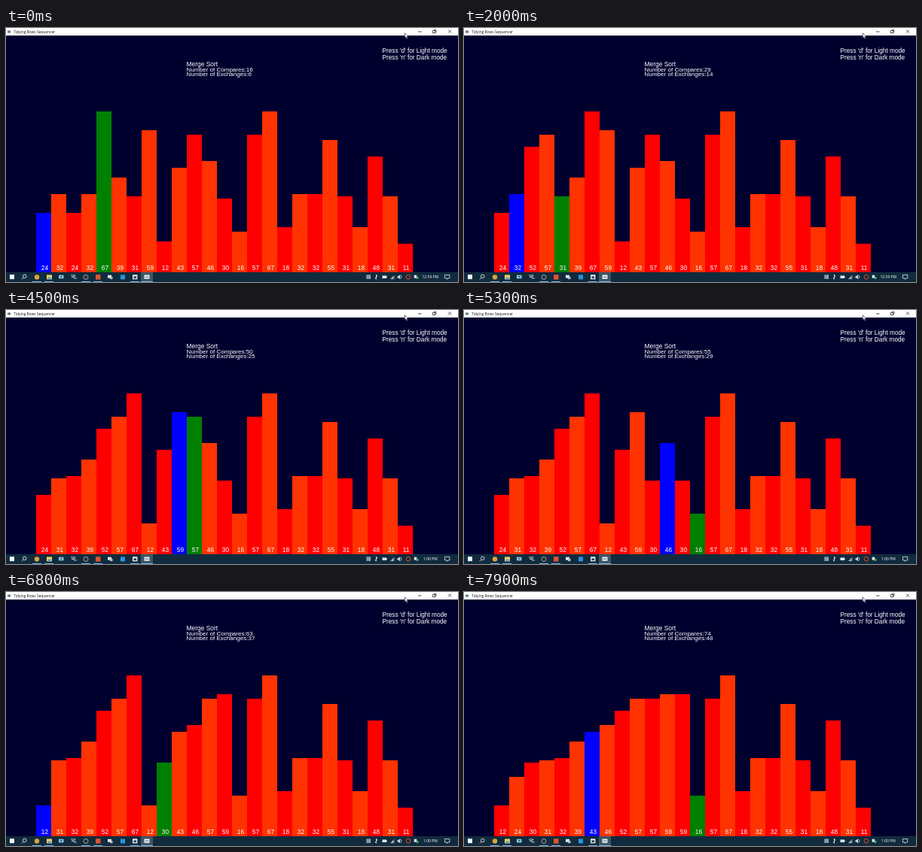
Recreate the animation shown at these times as an HTML page with a canvas. Size 600x338 px, loop 8000 ms.

```html
<!DOCTYPE html>
<html lang="en">
<head>
<meta charset="utf-8">
<title>Merge sort</title>
<style>
html, body { margin: 0; width: 100%; height: 100%; overflow: hidden; background: #00002f; }
canvas { display: block; width: 600px; height: 338px; }
</style>
</head>
<body>
<canvas id="stage" width="600" height="338"></canvas>
<script>
const ctx = document.getElementById('stage').getContext('2d');
const LOOP = 8000, STEP = 100, CLOCK_TURN = 2600;
const START = [52, 57, 24, 32, 67, 39, 31, 59, 12, 43, 57, 46, 30,
  16, 57, 67, 18, 32, 32, 55, 31, 18, 48, 31, 11];
// time of the first write of each merge; the first two lie before the loop
const MERGE_AT = [-1200, -600, -100, 700, 1300, 2000, 3200, 3800, 4600, 5200, 5800, 6800];
const SANS = '"Liberation Sans", Arial, sans-serif';
const UI = '"Open Sans", "Noto Sans", sans-serif';

// ---- sorting, recorded as timed states ----
const states = [];
const list = START.slice();
let compares = 0, exchanges = 0, merges = 0, left = 0, right = 0;

function record(at) {
  states.push({ at, list: list.slice(), compares, exchanges, left, right });
}

function merge(lo, mid, hi) {
  const first = MERGE_AT[merges++];
  if (first === undefined) return;
  if (states.length) record(states[states.length - 1].at + STEP);
  const old = list.slice();
  left = lo;
  right = mid + 1;
  for (let k = lo; k <= hi; k++) {
    const takeLeft = right > hi || (left <= mid && old[left] <= old[right]);
    list[k] = takeLeft ? old[left++] : old[right++];
    compares++;
    exchanges++;
    record(first + (k - lo) * STEP);
  }
}

function sort(lo, hi) {
  if (merges >= MERGE_AT.length) return;
  compares++;
  if (lo >= hi) return;
  const mid = (lo + hi) >> 1;
  sort(lo, mid);
  sort(mid + 1, hi);
  merge(lo, mid, hi);
}

sort(0, START.length - 1);

// ---- drawing helpers ----
function rect(x, y, w, h, color) {
  ctx.fillStyle = color;
  ctx.fillRect(x, y, w, h);
}

function disc(x, y, r, color) {
  ctx.fillStyle = color;
  ctx.beginPath();
  ctx.arc(x, y, r, 0, Math.PI * 2);
  ctx.fill();
}

function ring(x, y, r, color) {
  ctx.strokeStyle = color;
  ctx.lineWidth = 0.9;
  ctx.beginPath();
  ctx.arc(x, y, r, 0, Math.PI * 2);
  ctx.stroke();
}

function path(points, color, fill) {
  ctx.beginPath();
  points.forEach(([x, y], i) => i ? ctx.lineTo(x, y) : ctx.moveTo(x, y));
  if (fill) {
    ctx.closePath();
    ctx.fillStyle = fill;
    ctx.fill();
  }
  if (color) {
    ctx.strokeStyle = color;
    ctx.lineWidth = 0.8;
    ctx.stroke();
  }
}

function box(x, y, w, h, color) {
  ctx.strokeStyle = color;
  ctx.lineWidth = 0.8;
  ctx.strokeRect(x, y, w, h);
}

function text(str, x, y, size, color = '#fff', family = SANS) {
  ctx.font = size + 'px ' + family;
  ctx.fillStyle = color;
  ctx.fillText(str, x, y);
}

// ---- scene parts ----
function titleBar() {
  rect(0, 0, 600, 10, '#fff');
  rect(2, 3.5, 4, 3, '#5d7f86');
  text('Tidying Rows Sequencer', 10, 7, 4.9, '#111', UI);
  rect(547, 4.5, 4.5, 0.9, '#333');
  box(566.6, 3.6, 3, 3, '#333');
  path([[568, 3.4], [568, 2.4], [571, 2.4], [571, 5.4], [570, 5.4]], '#333');
  path([[587, 2.5], [591, 6.5]], '#333');
  path([[591, 2.5], [587, 6.5]], '#333');
}

function pointer() {
  path([[529.3, 6.8], [529.3, 13], [530.8, 11.8], [532, 14.3], [533, 13.8],
    [532, 11.4], [533.8, 11.2], [529.3, 6.8]], '#444', '#fff');
}

function taskIcons() {
  const pale = '#dfe7ec';
  rect(5, 328.2, 6, 6, '#f4f7f9');
  ring(24.7, 330.5, 2.3, pale);
  path([[23, 332.3], [21, 334.6]], pale);
  disc(41, 331.5, 3.2, '#d9a441');
  rect(54, 328.5, 7, 6, '#f2cf63');
  rect(55.5, 331.5, 4, 3, '#4f9fd0');
  rect(70, 328.8, 6.5, 4.6, '#8ec6dc');
  rect(72, 330, 2.5, 2, '#3a6f92');
  path([[86, 329], [92, 329], [90, 333], [94, 333]], pale);
  rect(87, 330.5, 3, 1.5, '#aebbc4');
  disc(106, 331.5, 3.3, '#262a30');
  ring(106, 331.5, 3, '#a9b3ba');
  rect(119, 328.2, 6.5, 6.5, '#d9542f');
  rect(135, 328.8, 5, 4, pale);
  rect(138, 331, 3.5, 3.2, '#b8c3ca');
  rect(152, 328.5, 6, 6, '#2795dc');
  rect(168, 328.4, 6.4, 6, '#f0f3f5');
  rect(169.3, 330.4, 3.8, 2.8, '#26475c');
  rect(183.5, 328.6, 7, 5.2, '#f0f3f5');
  rect(184.5, 330.6, 5, 1.3, '#66808f');
}

function tray(t) {
  const pale = '#dfe7ec';
  rect(478.5, 328.5, 5.5, 5.5, '#aab6be');
  path([[480.3, 328.5], [480.3, 334]], '#5c6f7c');
  path([[482.2, 328.5], [482.2, 334]], '#5c6f7c');
  path([[491, 328], [493, 330], [490, 333], [491.5, 334.2], [491.5, 328]], pale);
  rect(499.5, 329.5, 5.5, 3.6, pale);
  rect(505, 330.5, 0.8, 1.6, pale);
  for (let i = 0; i < 4; i++) {
    rect(510.5 + i * 1.4, 333 - i * 1.3, 1, 1.2 + i * 1.3, i < 3 ? pale : '#7f909b');
  }
  path([[519.5, 330.3], [521, 330.3], [523, 328.5], [523, 334], [521, 332.4], [519.5, 332.4]], null, pale);
  ring(523, 331.3, 2, '#b9c4cb');
  disc(534, 331.3, 3.2, '#25282d');
  ring(534, 331.3, 2.9, '#d8553f');
  rect(541.7, 328.8, 3.5, 4, pale);
  disc(546, 332.5, 1.7, '#4db071');
  text(t < CLOCK_TURN ? '12:59 PM' : '1:00 PM', t < CLOCK_TURN ? 552.5 : 554, 333.3, 5, '#fff', UI);
  path([[582.5, 328.5], [588.8, 328.5], [588.8, 333], [586.5, 333], [585.5, 334.5],
    [585.2, 333], [582.5, 333], [582.5, 328.5]], pale);
}

function taskBar(t) {
  rect(0, 325, 600, 13, '#112b3e');
  rect(179, 325, 16, 13, '#3d5566');
  for (const x of [35, 51, 100, 116, 165]) rect(x, 337, 12, 1, '#76b9ed');
  rect(179, 337, 16, 1, '#76b9ed');
  taskIcons();
  tray(t);
}

function bars(s) {
  s.list.forEach((value, i) => {
    const x = 40 + i * 20;
    const top = Math.round(325 - (value * 3.15 + 3.2));
    let color = i % 2 ? '#ff3300' : '#ff0000';
    if (i === s.left) color = '#0000ff';
    if (i === s.right) color = '#008000';
    rect(x, top, 20, 325 - top, color);
    text(String(value), x + 6.8, 321.6, 8.3);
  });
}

function draw(t) {
  let s = states[0];
  for (const next of states) if (next.at <= t) s = next;
  rect(0, 0, 600, 338, '#00002f');
  bars(s);
  text('Merge Sort', 239.6, 51, 8.4);
  text('Number of Compares:' + s.compares, 239.6, 57.6, 8.05);
  text('Number of Exchanges:' + s.exchanges, 239.6, 63.8, 8.05);
  text("Press 'd' for Light mode", 499.5, 32.6, 8.25);
  text("Press 'n' for Dark mode", 499.5, 41.8, 8.25);
  titleBar();
  pointer();
  taskBar(t);
}

const began = performance.now();
function tick() {
  draw((performance.now() - began) % LOOP);
  requestAnimationFrame(tick);
}
tick();
</script>
</body>
</html>
```
